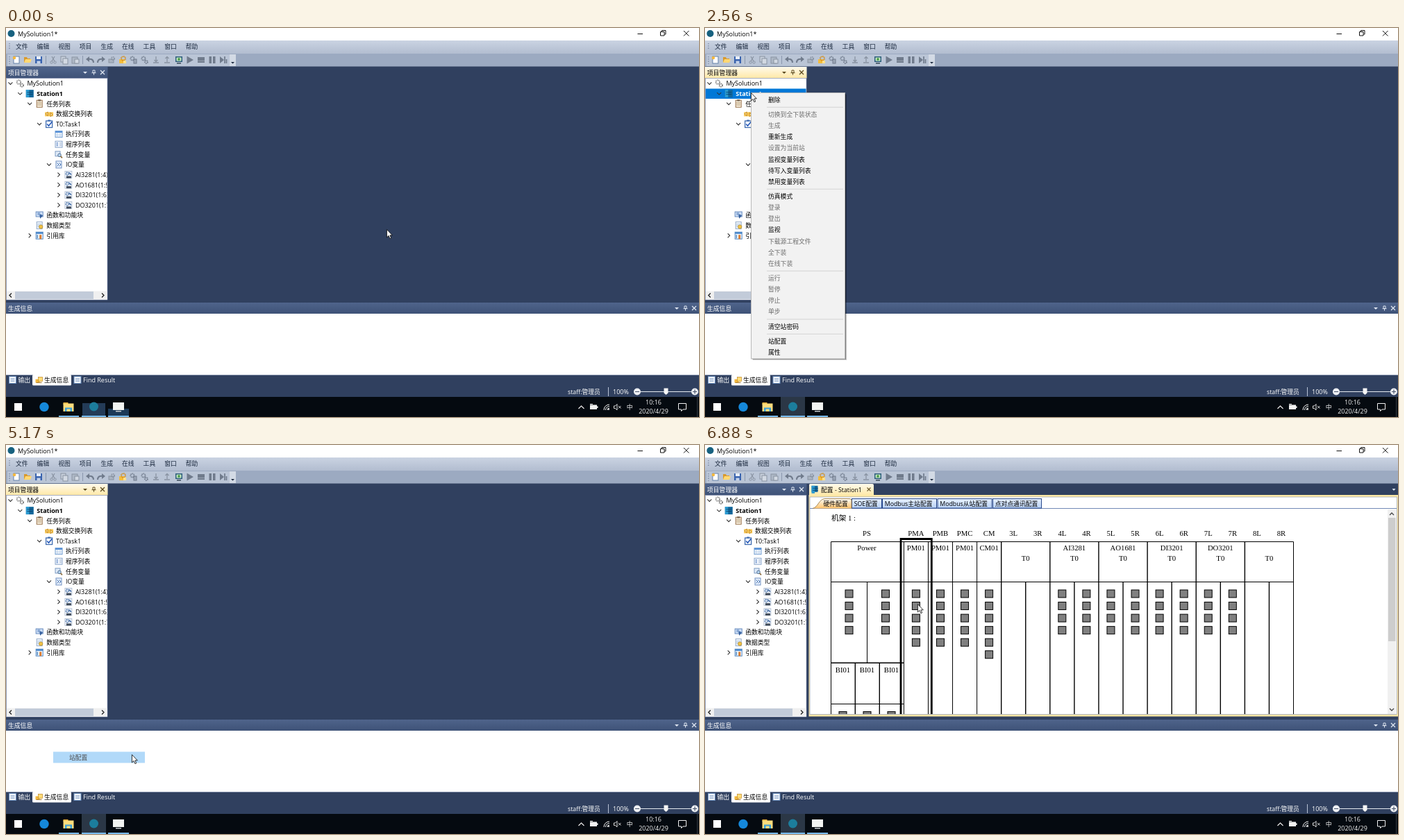
Animation of 998x561 px, one loop 8 s. Source, as an HTML page:

```html
<!DOCTYPE html>
<html lang="zh-CN">
<head>
<meta charset="utf-8">
<title>MySolution1</title>
<style>
html, body { margin: 0; width: 100%; height: 100%; overflow: hidden; background: #30405f; }
svg { display: block; width: 998px; height: 561px; }
text { font-family: "Open Sans", "Noto Sans CJK SC", "Noto Sans CJK", sans-serif; white-space: pre; }
.serif { font-family: "Liberation Serif", "Noto Serif", "Noto Sans CJK SC", serif; }
</style>
</head>
<body>
<svg id="stage" viewBox="0 0 998 561" xmlns="http://www.w3.org/2000/svg">
<defs>
  <linearGradient id="bar" x2="0" y2="1"><stop stop-color="#cad3e2"/><stop offset="1" stop-color="#b2bdd0"/></linearGradient>
  <linearGradient id="head" x2="0" y2="1"><stop stop-color="#4f648b"/><stop offset="1" stop-color="#3e5277"/></linearGradient>
  <linearGradient id="gold" x2="0" y2="1"><stop stop-color="#fffaec"/><stop offset=".5" stop-color="#fff1c9"/><stop offset="1" stop-color="#ffe8a6"/></linearGradient>
  <linearGradient id="orange" x2="0" y2="1"><stop stop-color="#fffdf8"/><stop offset="1" stop-color="#ffc36b"/></linearGradient>
  <linearGradient id="sky" x2="0" y2="1"><stop stop-color="#e6f0ff"/><stop offset="1" stop-color="#b9d2f5"/></linearGradient>
  <clipPath id="treeClip"><path d="M0 72H145.5V379H0Z"/></clipPath>
  <clipPath id="docClip"><path d="M151 92H983V388H151Z"/></clipPath>
</defs>
</svg>
<script>
const stage = document.getElementById('stage');
const rect = (x, y, w, h, fill, more = '') => `<rect x="${x}" y="${y}" width="${w}" height="${h}" fill="${fill}" ${more}/>`;
const path = (d, stroke, w = 1, fill = 'none') => `<path d="${d}" fill="${fill}" stroke="${stroke}" stroke-width="${w}"/>`;
const shape = (d, fill) => `<path d="${d}" fill="${fill}"/>`;
const disc = (x, y, r, fill, more = '') => `<circle cx="${x}" cy="${y}" r="${r}" fill="${fill}" ${more}/>`;
const at = (x, y, body) => `<g transform="translate(${x} ${y})">${body}</g>`;
const group = (id, body) => `<g id="${id}">${body}</g>`;
const label = (x, cy, s, fill = '#000', more = '') =>
  `<text x="${x}" y="${cy + 3.3}" font-size="${/[\u4e00-\u9fa5]/.test(s) ? 8.8 : 9}" fill="${fill}" ${more}>${s}</text>`;
const serif = (x, cy, s, anchor = 'middle') =>
  `<text class="serif" x="${x}" y="${cy + 3.5}" font-size="10.7" text-anchor="${anchor}">${s}</text>`;

// Icons, drawn around 0,0
const sheet = (edge = '#7f93ad', body = '#fff') => rect(-4, -5, 8, 10, body, `stroke="${edge}"`);
const lines = c => path('M-3 -2H3M-3 0H3M-3 2H3', c, .8);
const gear = (c, x = 0, y = 0, r = 2.2) => disc(x, y, r, 'none', `stroke="${c}" stroke-width="1.8" stroke-dasharray="1.5 .8"`);
const table = rect(-5, -4.5, 10, 9, '#fff', 'stroke="#6e9bd0"') + rect(-5, -4.5, 10, 2.5, '#5b93d8');
const icons = {
  solution: gear('#888', -2, -2, 2.8) + gear('#777', 2.5, 2.5, 2.2),
  station: rect(-5.5, -5.5, 11, 11, '#12679b') + shape('M-5.5 -5.5H-1V5.5H-5.5Z', '#2b9ad0') + path('M-4 -2H4M-4 1H4', '#0d3f66', .8),
  tasks: sheet('#98714a', '#fbf3e4') + rect(-2, -6, 4, 2.2, '#77634f') + lines('#a98b63'),
  swap: rect(-6, -2.5, 12, 6, '#f6c756') + path('M-5 0L-2 -3V3ZM5 1L2 -2V4Z', '#b87710', .8, '#ffe59a'),
  task: rect(-4.5, -4.5, 9, 9.5, '#fff', 'stroke="#3f6cb0" stroke-width="1.3"') + rect(-2, -6, 4, 2, '#3f6cb0') + path('M-3 0L-.6 2.6L4 -3', '#2458b8', 1.6),
  grid: table + path('M-5 .3H5M-5 2.5H5M-2 -2V4.5M2 -2V4.5', '#a9c5e6', .7),
  program: rect(-5, -4.5, 10, 9, '#f4f8ff', 'stroke="#89a5c9"') + path('M-3.5 -2H-1M-3.5 0H-1M-3.5 2H-1', '#557fc0') + path('M1 -2H4M1 0H4M1 2H4', '#aabbd0'),
  vars: rect(-5, -4.5, 7, 7, '#dfeaf8', 'stroke="#7e9cc2"') + disc(1, 1, 2.3, '#b8d8f8', 'stroke="#56718f"') + path('M2.6 2.6L5 5', '#8a6a3c', 1.6),
  io: sheet('#6f8fc0', '#e9f1fd') + path('M-2.5 -2.5L0 0L-2.5 2.5M.5 -2.5L3 0L.5 2.5', '#3766a8'),
  module: rect(-5, -5, 10, 10, '#edf2f8', 'stroke="#a2b2c8" stroke-width=".7"') + gear('#5a7fb2', -1.5, -1.5, 2) + rect(-3, 2, 7, 3, '#414b59') + path('M1 -3L4 0', '#315fa0', 1.4),
  blocks: rect(-5, -5, 10, 7, '#d5e5fb', 'stroke="#6388bc"') + path('M-3 -3H1M-3 -1H3', '#4672af') + shape('M0 -1L5 0L1 5Z', '#335e9d'),
  types: sheet('#93a9c6', '#f4f9ff') + lines('#9bb5d5') + disc(2, 2, 2.7, '#f1c247', 'stroke="#a8852d" stroke-width=".7"'),
  library: rect(-5, -5, 10, 10, '#eaf3ff', 'stroke="#578bc4"') + rect(-5, -5, 10, 2.6, '#4b88ca') + rect(0, -1, 3, 6, '#dc7d30') + path('M-3 -1V4', '#568ac2', 1.5),
  output: rect(-5, -5, 10, 10, '#f4f8ff', 'stroke="#668ab9"') + lines('#7696bd'),
  build: rect(-5, -1, 6, 5, '#f1b83e') + rect(-1, -4, 6, 6, '#ffdd78', 'stroke="#c08724" stroke-width=".7"') + path('M-4 4H4', '#a6782e'),
  fresh: sheet('#6482aa') + disc(-3, -3, 2.2, '#f5b83d'),
  folder: shape('M-5 -4H-1L0 -2H4V4H-5Z', '#d8992d') + shape('M-3 -1H6L4 4H-5Z', '#ffd873'),
  save: rect(-5, -5, 10, 10, '#3a64af') + rect(-3, -5, 6, 4, '#e8effb') + rect(-2.5, 1.5, 5, 3.5, '#c4d2e9')
};
const chevron = (x, y, open, c = '#333') => path(open ? `M${x - 3} ${y - 1.6}l3 3l3 -3` : `M${x - 1.5} ${y - 3}l3 3l-3 3`, c, 1.1);
const paneButtons = (xs, y, c) =>
  shape(`M${xs[0] - 3} ${y - 1}h6l-3 3Z`, c) +
  path(`M${xs[1] - 1.5} ${y - 3}h3v3.5h-3ZM${xs[1] - 3} ${y + .7}h6M${xs[1]} ${y + .7}v3`, c, 1) +
  path(`M${xs[2] - 3} ${y - 3}l6 6m0 -6l-6 6`, c, 1.3);

function titleAndBars() {
  let s = rect(0, 0, 998, 18, '#fff') + disc(7.5, 8, 5, '#17617f') + label(17, 8.3, 'MySolution1*');
  s += path('M909.5 8.5H917M942.5 5.5H948V11H942.5ZM944.5 5V3.5H950V9H948.5M976 4L983.5 11.5M983.5 4L976 11.5', '#111', 1);
  s += rect(0, 18, 998, 19, 'url(#bar)') + rect(0, 37, 998, 18.5, '#9caac1') + rect(2, 38, 328, 17, '#bac5d6');
  s += path('M5 22V32M5 41V52', '#77859c', 1.3).replace('/>', ' stroke-dasharray="1.3 2"/>');
  ['文件', '编辑', '视图', '项目', '生成', '在线', '工具', '窗口', '帮助'].forEach((m, i) => s += label(14 + i * 30.6, 27, m, '#1b293e'));
  return s + toolbar();
}

function toolbar() {
  const g = '#8993a2', d = '#707b8c';
  const draw = {
    15: icons.fresh, 31: icons.folder, 47: icons.save,
    68: path('M-2 -5L2 2M2 -5L-2 2', g, 1.2) + disc(-2.5, 3.5, 1.7, 'none', `stroke="${g}"`) + disc(2.5, 3.5, 1.7, 'none', `stroke="${g}"`),
    84: rect(-5, -5, 7, 8, '#c8d0dc', `stroke="${g}"`) + rect(-2, -2, 7, 8, '#d2d9e3', `stroke="${g}"`),
    100: rect(-5, -4, 8, 9, '#aeb8c6', `stroke="${g}"`) + rect(-1, -1, 6, 6, '#d2d9e3', `stroke="${g}"`),
    121: path('M5 4C5 -1 1 -2 -3 -1', d, 2) + shape('M-6 -1L-1 -5V3Z', d),
    137: path('M-5 4C-5 -1 -1 -2 3 -1', d, 2) + shape('M6 -1L1 -5V3Z', d),
    152: rect(-4, -1, 7, 5, '#a9b3c1', `stroke="${g}"`) + gear(g, 2, -2),
    168: rect(-5, -1, 8, 6, '#f3bd3e') + gear('#d38c1c', 1, -2, 3) + rect(1, 1, 4, 4, '#ffe08a'),
    184: gear(d, -2, -2, 2.6) + rect(0, -1, 4, 6, '#9ca7b7', `stroke="${d}"`),
    200: gear(d, -2, -2, 2.6) + gear(d, 2, 3, 2),
    216: path('M0 -5V2M-2.5 0L0 2.5L2.5 0M-4 4H4', g, 1.3),
    232: path('M0 3V-4M-2.5 -2L0 -4.5L2.5 -2M-4 4H4', g, 1.3),
    249: rect(-5, -5, 10, 8, '#2c5d7c') + rect(-3.5, -3.5, 7, 5, '#cceec2') + disc(0, -1, 1.8, '#3d9440') + rect(-3, 4, 6, 1.5, '#364656'),
    265: shape('M-4.5 -5.5L5 0L-4.5 5.5Z', d),
    281: rect(-5, -4, 10, 8, d) + rect(-5, 1, 10, 1, '#99a4b4'),
    297: rect(-4.5, -5, 3.5, 10, d) + rect(1, -5, 3.5, 10, d),
    313: shape('M-5 -5L1 0L-5 5Z', d) + path('M2 -5V5M4.5 -1V5', d, 1.7)
  };
  let s = path('M57.5 40V52M110.5 40V52', '#8a97ad');
  for (const x in draw) s += at(x, 46, draw[x]);
  return s + rect(322, 38, 9, 17, '#d3dae5') + shape('M324 49H329L326.5 51.5Z', '#1b293e');
}

const rows = [
  [0, 'MySolution1', 'solution', 1], [1, 'Station1', 'station', 1], [2, '任务列表', 'tasks', 1],
  [3, '数据交换列表', 'swap'], [3, 'T0:Task1', 'task', 1], [4, '执行列表', 'grid'], [4, '程序列表', 'program'],
  [4, '任务变量', 'vars'], [4, 'IO变量', 'io', 1], [5, 'AI3281(1:4)', 'module', 0], [5, 'AO1681(1:5)', 'module', 0],
  [5, 'DI3201(1:6)', 'module', 0], [5, 'DO3201(1:7)', 'module', 0], [2, '函数和功能块', 'blocks'],
  [2, '数据类型', 'types'], [2, '引用库', 'library', 0]
];
function treeRow(i, ink = '#000') {
  const [level, name, icon, open] = rows[i], x = 30.4 + 13.9 * level, y = 80 + 14.62 * i;
  return (open === undefined ? '' : chevron(x - 24, y, open)) + at(x - 10, y, icons[icon]) +
    label(x, y, name, ink, i === 1 ? 'font-weight="700"' : '');
}
function treePane() {
  let s = rect(0, 56, 146.5, 16.5, 'url(#head)') + label(3, 64.3, '项目管理器', '#fff') + paneButtons([114, 126.5, 139], 64, '#dfe6f1');
  s += group('paneOn', rect(0, 56, 146.5, 16.5, 'url(#gold)') + label(3, 64.3, '项目管理器') + paneButtons([114, 126.5, 139], 64, '#5c4a1e'));
  s += rect(.5, 72.5, 145.5, 319.5, '#fff', 'stroke="#8e9bbc" stroke-width=".6"');
  s += `<g clip-path="url(#treeClip)">${rows.map((_, i) => treeRow(i)).join('')}` +
    group('picked', rect(1, 87.5, 145, 14.5, '#0078d7') + treeRow(1, '#fff')) + '</g>';
  s += rect(1, 379.5, 144.5, 12, '#f0f0f0') + rect(13, 380, 113, 11, '#c2cbd9');
  return s + path('M8 382.5L5 385.5L8 388.5M138 382.5L141 385.5L138 388.5', '#222', 1.3);
}

function bottomPane() {
  let s = rect(0, 396, 998, 16, 'url(#head)') + label(3, 404.3, '生成信息', '#fff') + paneButtons([966, 978.5, 991], 404, '#dfe6f1');
  s += rect(0, 412, 998, 88, '#fff') + rect(0, 500, 998, 1, '#8290aa');
  s += rect(38, 500, 56, 15.5, '#fff', 'rx="1.5"');
  s += at(9.5, 507.5, icons.output) + label(17.5, 507.5, '输出', '#fff') + at(47.5, 507.5, icons.build) + label(55, 507.5, '生成信息');
  s += at(103, 507.5, icons.output) + label(111, 507.5, 'Find Result', '#fff');
  s += label(809, 524.5, 'staff:管理员', '#fff') + rect(867, 518, 1, 13, '#b8c2d4') + label(874, 524.5, '100%', '#fff');
  s += path('M914 524.5H987', '#e4e9f0') + shape('M947.5 519.5H953.5V526.5L950.5 529L947.5 526.5Z', '#f5f5f5');
  s += disc(909, 524.5, 5, '#eef0f4') + disc(992, 524.5, 5, '#eef0f4');
  return s + path('M906 524.5H912M989 524.5H995M992 521.5V527.5', '#47536a', 1.2);
}

function taskbar() {
  const under = (x, w) => rect(x, 559, w, 2, '#76b9ed');
  let s = rect(0, 532, 998, 29, '#050a10');
  s += group('busy', rect(110, 541, 33, 20, '#243b57') + rect(147, 549, 30, 12, '#1c3a58'));
  s += group('calm', rect(109, 532, 35, 29, '#2b3746'));
  s += rect(12, 541, 11, 11, '#fff') + disc(55, 546.5, 6.7, '#1588da');
  s += at(90, 546.5, rect(-7.5, -6.5, 7, 3, '#e7ae38') + rect(-7.5, -5, 15, 11.5, '#ffdc7c') + rect(-5, 1, 10, 5.5, '#3ba0d9') + rect(-2.5, 3, 5, 3.5, '#ffdc7c'));
  s += disc(126.5, 546, 6.5, '#1c7d9c') + rect(154, 540, 16, 11, '#f2f4f2') + rect(158, 552, 8, 1.5, '#c7cccf');
  s += under(76, 29) + under(109, 35) + under(147, 30);
  const w = '#f2f2f2';
  s += path('M824.5 549L828.5 545L832.5 549', w, 1.1) + rect(841.5, 544, 9, 5.5, w, `stroke="${w}"`) + rect(851, 545.5, 1.5, 2.5, w) + path('M841 542.5H845', w);
  s += path('M861 551A8 8 0 0 1 869 543M863.5 551A5.5 5.5 0 0 1 869 545.5M866 551A3 3 0 0 1 869 548', w, 1) + disc(868, 550, 1, w);
  s += path('M875.5 545H877.5L880 542.5V551L877.5 548.5H875.5ZM882 545L885.5 548.5M885.5 545L882 548.5', w, .9);
  s += label(893.7, 546.5, '中', w) + label(932.5, 539.5, '10:16', w, 'text-anchor="middle"') + label(932.5, 553, '2020/4/29', w, 'text-anchor="middle"');
  return s + path('M968.5 541.5H979.5V550H975L972.5 552.5V550H968.5Z', w, 1) + rect(995, 532, 1, 29, '#333a42');
}

function rack() {
  const col = i => 286.4 + 35.07 * i, mid = i => col(i) + 17.5;
  let s = serif(182, 105.5, '机架 1 :', 'start') + serif(233, 127.5, 'PS') + serif(233, 148.5, 'Power');
  const line = (d, w = 1) => path(d, '#000', w);
  const leds = (x, n) => Array.from({ length: n }, (_, k) => rect(x - 5.5, 209 + 17.55 * k, 11, 11, '#808080', 'stroke="#000"')).join('');
  const names = ['PMA', 'PMB', 'PMC', 'CM'];
  for (let n = 3; n < 9; n++) names.push(n + 'L', n + 'R');
  s += line('M181.5 400V139.5H847.5V400M181.5 197.5H847.5M181.5 373.5H286.4M233.5 197.5V314');
  s += line('M181.5 314.2H286.4', 1.6);
  names.forEach((name, i) => {
    s += serif(mid(i), 127.5, name);
    const half = i > 4 && i % 2;
    s += line(`M${col(i)} ${half ? 197.5 : 139.5}V400`, i > 3 ? 1.4 : 1);
    if (i < 4) s += serif(mid(i), 148.5, i < 3 ? 'PM01' : 'CM01');
    if (i < 4) s += leds(mid(i), i < 3 ? 5 : 6);
    else if (i > 5 && i < 14) s += leds(mid(i), 4);
    if (half) s += serif(col(i), 163, 'T0');
  });
  ['AI3281', 'AO1681', 'DI3201', 'DO3201'].forEach((n, i) => s += serif(col(7 + 2 * i), 148.5, n));
  s += leds(207.5, 4) + leds(260, 4) + line('M216.3 314V400M251.3 314V400', 1.4);
  for (let i = 0; i < 3; i++) s += serif(198.5 + 35 * i, 324, 'BI01') + rect(193 + 35 * i, 384.5, 11, 11, '#808080', 'stroke="#000"');
  return s + group('chosen', line('M282 400V135.5H326.3V400', 2.8));
}

function docPane() {
  let s = shape('M150 73V57.5Q150 56 151.5 56H241Q243 56 243 58V73Z', 'url(#gold)') + at(159, 64.3, icons.station.replace(/11"/g, '9"'));
  s += label(167, 64.3, '配置 - Station1') + path('M233.5 61.5L238.5 66.5M238.5 61.5L233.5 66.5', '#6e5b2c', 1.1) + shape('M989.5 63H994.5L992 66Z', '#dfe6f1');
  s += rect(149.5, 72, 848.5, 319.5, '#ffe8a6') + rect(151, 75, 845.5, 313.5, '#fff', 'stroke="#8190aa" stroke-width=".6"');
  s += path('M151 91.5H996', '#7289b5');
  [['SOE配置', 211, 43], ['Modbus主站配置', 255, 78], ['Modbus从站配置', 334.5, 78], ['点对点通讯配置', 414, 70]].forEach(([n, x, w]) =>
    s += rect(x + .5, 77.5, w, 13.5, 'url(#sky)', 'stroke="#27488c"') + label(x + 3.7, 84.3, n));
  s += path('M155 91.5C163 90 164 77.5 173 77.5H208Q211 77.5 211 80V91.5', '#9b7b45', .9, 'url(#orange)') + label(170.5, 84.3, '硬件配置');
  s += `<g clip-path="url(#docClip)">${rack()}</g>`;
  s += rect(983, 93, 12.5, 295, '#f0f0f0') + rect(984, 105, 10.5, 178, '#cdcdcd');
  return s + path('M986 101L989 98L992 101M986 380L989 383L992 380', '#444', 1.3);
}

// '-' marks a separator, a leading '~' a disabled entry
const entries = '删除 - ~切换到全下装状态 ~生成 重新生成 ~设置为当前站 监视变量列表 待写入变量列表 禁用变量列表 - 仿真模式 ~登录 ~登出 监视 ~下载源工程文件 ~全下装 ~在线下装 - ~运行 ~暂停 ~停止 ~单步 - 清空站密码 - 站配置 属性'.split(' ');
const items = [];
function menu() {
  let y = 95.3, s = '';
  for (const e of entries) {
    if (e === '-') { s += rect(89, y + 2.3, 110, 1, '#d4d4d4'); y += 5.15; continue; }
    const off = e[0] === '~';
    items.push({ y, off });
    s += label(91, y + 8.1, e.replace('~', ''), off ? '#6d6d6d' : '#000');
    y += 16.13;
  }
  return rect(69, 96, 135, 383, '#000', 'opacity=".22"') + rect(68, 95, 135, 383, '#000', 'opacity=".35"') +
    rect(66.5, 93.5, 135, 383.5, '#f2f2f2', 'stroke="#b9b9b9"') + rect(68, 0, 132, 16.1, '#91c9f7', 'id="hot"') + s;
}

const arrow = path('M.4 .6V12L3 9.5L4.9 13.7L6.7 12.9L4.9 8.9H8.3Z', '#000', .8, '#fff');
stage.insertAdjacentHTML('beforeend',
  rect(0, 0, 998, 561, '#30405f') + titleAndBars() + treePane() + group('doc', docPane()) + bottomPane() + taskbar() +
  group('menu', menu()) + group('ghost', rect(68, 442.4, 132, 16.1, '#91c9f7') + label(91, 450.5, '站配置')) + group('cursor', arrow));

const $ = id => document.getElementById(id);
const show = (id, opacity) => $(id).setAttribute('opacity', +opacity);

// time, x, y, number of steps towards the next row, smooth or linear
const track = [
  [0, 548, 290, 1], [710, 543, 288, 6, 1], [1160, 107, 105, 4], [1480, 78, 96, 1], [1550, 66, 93, 1],
  [2990, 69, 98, 5, 1], [3340, 142, 203, 6, 1], [3790, 180, 433, 1], [3860, 181, 440, 1],
  [4030, 181, 443, 2], [4160, 181, 446, 1], [6050, 184, 441, 8, 1], [6650, 306, 229, 1], [8000, 306, 229, 1]
];
const pick = (steps, t) => steps.reduce((v, [from, value]) => t >= from ? value : v, 0);
const menuFade = [[2390, .5], [2480, .85], [2560, 1], [5170, 0]];
const ghostFade = [[5170, .7], [5250, .45], [5320, .25], [5400, .1], [5490, 0]];

function pointer(t) {
  let i = track.length - 2;
  while (track[i][0] > t) i--;
  const [t0, x0, y0, n, smooth] = track[i], [t1, x1, y1] = track[i + 1];
  const k = Math.floor((t - t0) / (t1 - t0) * n + 1e-6) / n;
  const p = smooth ? k * k * (3 - 2 * k) : k;
  return [x0 + (x1 - x0) * p, y0 + (y1 - y0) * p];
}

function draw(t) {
  const [x, y] = pointer(t);
  $('cursor').setAttribute('transform', `translate(${x} ${y})`);
  show('busy', t < 70);
  show('calm', t >= 70);
  show('paneOn', t >= 1780 && t < 5490);
  show('picked', t >= 1780 && t < 5170);
  show('menu', pick(menuFade, t));
  show('ghost', pick(ghostFade, t));
  show('doc', t >= 5490);
  show('chosen', t >= 6880);
  const over = x > 68 && items.find(e => y >= e.y && y < e.y + 16.13);
  show('hot', !!over);
  if (over) {
    $('hot').setAttribute('y', over.y);
    $('hot').setAttribute('fill', over.off ? '#e6e6e6' : '#91c9f7');
  }
}

const start = performance.now();
function tick() {
  draw((performance.now() - start) % 8000);
  requestAnimationFrame(tick);
}
draw(0);
requestAnimationFrame(tick);
</script>
</body>
</html>
```
